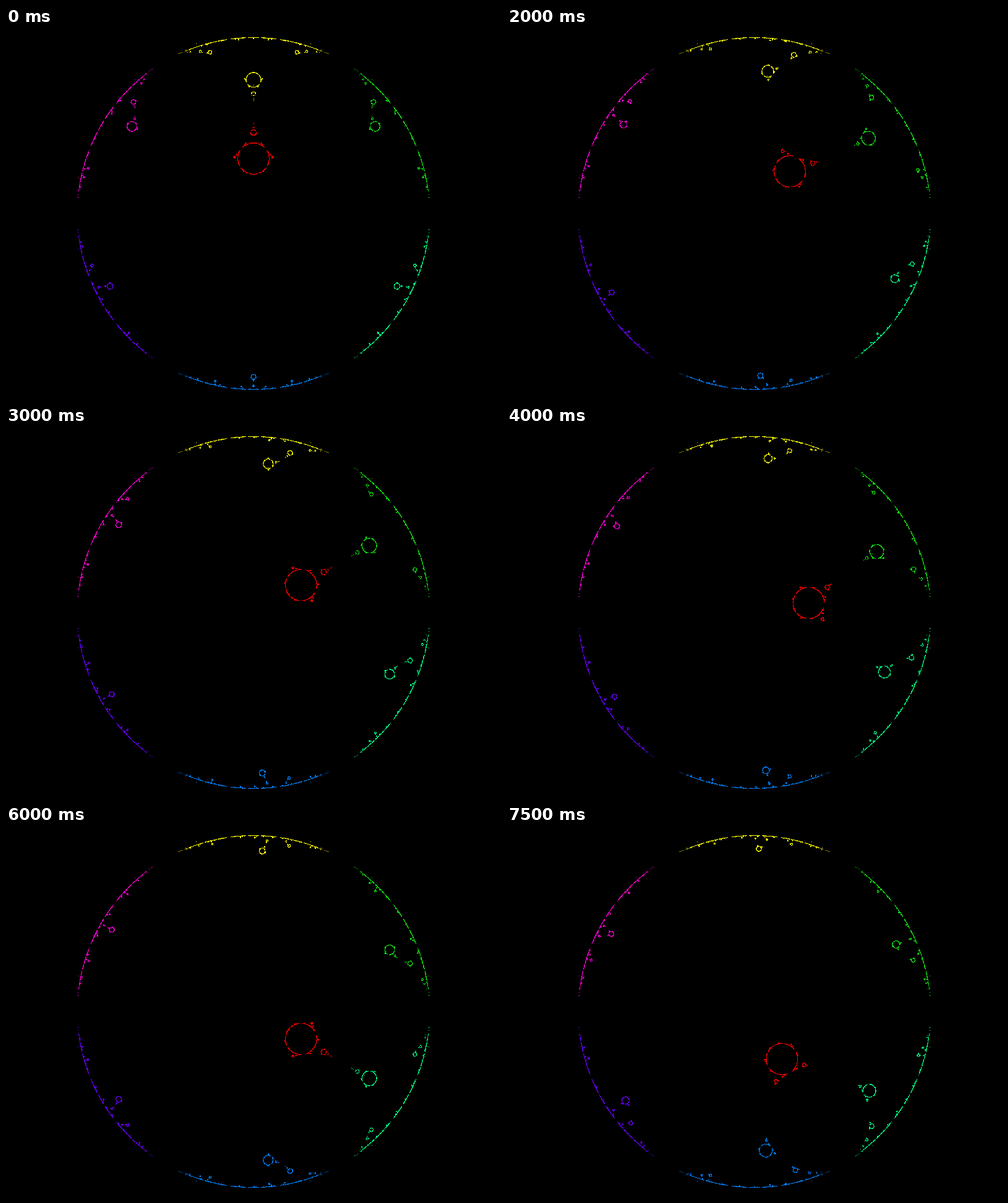
These frames come from a looping animation (800x600 px, 8000 ms). An HTML page with a canvas:

```html
<!DOCTYPE html>
<html lang="en">
<head>
<meta charset="utf-8">
<title>Circle inversions</title>
<style>
html, body { margin: 0; width: 100%; height: 100%; overflow: hidden; background: #000; }
canvas { display: block; width: 800px; height: 600px; }
</style>
</head>
<body>
<canvas id="stage" width="800" height="600"></canvas>
<script>
const ctx = document.getElementById('stage').getContext('2d');
const LOOP = 8000, STEP = 500, TURN = 18000, DEPTH = 6;
const COLORS = ['#ff0', '#10e010', '#00ff80', '#0080ff', '#6a00ff', '#ff00d4', '#f00'];

// Circle at a clockwise angle (in turns) from the top of the stage.
function circleAt(turn, distance, r) {
  const a = turn * 2 * Math.PI;
  return { x: 400 + distance * Math.sin(a), y: 300 - distance * Math.cos(a), r };
}

const ring = COLORS.slice(0, 6).map((_, i) => circleAt(i / 6, 327.6, 162.2));

function invert(circle, mirror) {
  const dx = circle.x - mirror.x, dy = circle.y - mirror.y;
  const k = mirror.r ** 2 / (dx * dx + dy * dy - circle.r ** 2);
  return { x: mirror.x + k * dx, y: mirror.y + k * dy, r: Math.abs(k) * circle.r };
}

// Dots the centres of all nested mirror images of the circles.
function walk(circles, last, depth) {
  circles.forEach((mirror, i) => {
    if (i === last) return;
    if (depth === 1) ctx.fillStyle = COLORS[i];
    else ctx.fillRect(Math.floor(mirror.x), Math.floor(mirror.y), 1, 1);
    if (depth < DEPTH) walk(circles.map(c => invert(c, mirror)), i, depth + 1);
  });
}

function draw(time) {
  ctx.fillStyle = '#000';
  ctx.fillRect(0, 0, 800, 600);
  walk([...ring, circleAt(time / TURN, 81.6, 81.1)], -1, 1);
}

let shown = -1;
function tick() {
  const step = Math.floor(performance.now() % LOOP / STEP);
  if (step !== shown) draw((shown = step) * STEP);
  requestAnimationFrame(tick);
}
tick();
</script>
</body>
</html>
```
